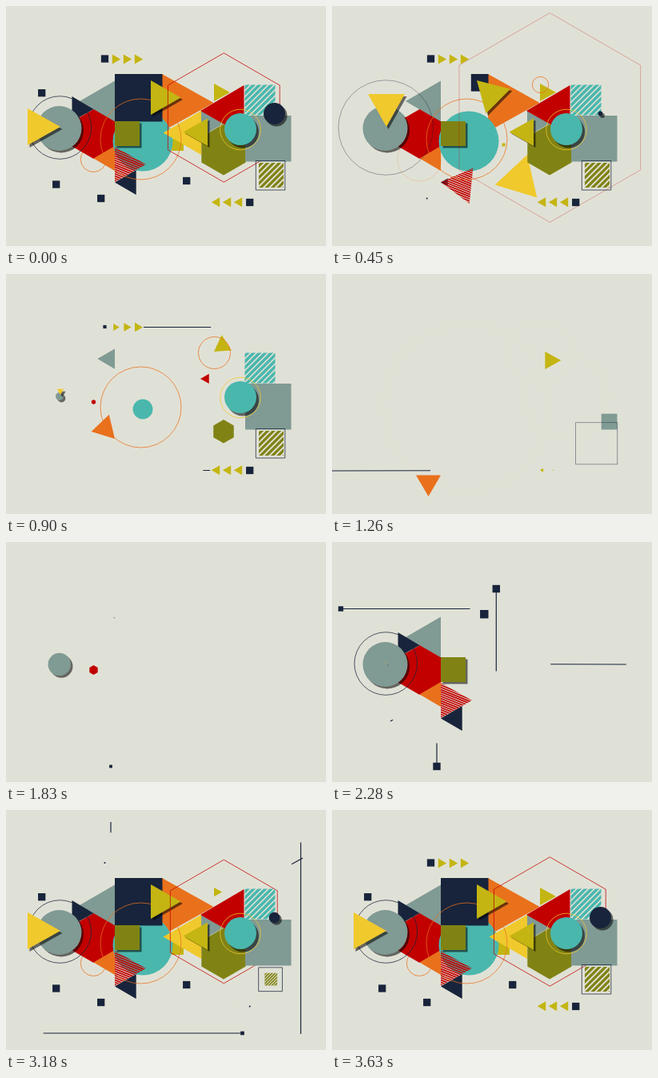
Recreate the animation shown at these times as an HTML page with a canvas. Size 400x300 px, loop 3.66 s.

```html
<!DOCTYPE html>
<html>
<head>
<meta charset="utf-8">
<style>
html, body { margin: 0; overflow: hidden; background: #e0e1d6; }
canvas { display: block; }
</style>
</head>
<body>
<canvas id="stage" width="400" height="300"></canvas>
<script>
const ctx = document.getElementById('stage').getContext('2d');
const LOOP = 3660, HALF = 1650, DUR = 360, NEVER = 9999;
const bg = '#e0e1d6', navy = '#18243b', gray = '#809a94', red = '#c20000', orange = '#e9711c',
      teal = '#4ab7ad', olive = '#808314', lime = '#c4b512', yellow = '#f0c92c';
let t = 0;

// Eased progress, cubic in and out
function ease(start, dur = DUR) {
  const u = Math.min(1, Math.max(0, (t - start) / dur));
  return u < .5 ? 4 * u ** 3 : 1 - 4 * (1 - u) ** 3;
}

const poly = (...p) => {
  const path = new Path2D();
  for (let i = 0; i < p.length; i += 2) path.lineTo(p[i], p[i + 1]);
  path.closePath();
  return path;
};
const disc = (x, y, r) => { const p = new Path2D(); p.arc(x, y, r, 0, 7); return p; };
const box = (x, y, w, h = w) => { const p = new Path2D(); p.rect(x, y, w, h); return p; };
const hex = (x, y, r) => {
  const w = r * .866, h = r / 2;
  return poly(x, y - r, x + w, y - h, x + w, y + h, x, y + r, x - w, y + h, x - w, y - h);
};

function place([x, y], scale, angle = 0, dx = 0, dy = 0) {
  ctx.translate(x + dx, y + dy);
  ctx.rotate(angle);
  ctx.scale(scale, scale);
  ctx.translate(-x, -y);
}

// stripe: [angle in degrees, gap, bar width]; spin: [degrees, start, dur]; fly: [ax, ay, start]
function solid(path, color, pivot, enter, leave, { shadow, stripe, spin, fly } = {}) {
  const leaving = t < HALF;
  const scale = leaving ? 1 - ease(leave) : ease(enter);
  if (scale < .005) return;
  const angle = leaving && spin ? spin[0] * Math.PI / 180 * ease(spin[1], spin[2]) : 0;
  const fall = leaving && fly ? Math.max(0, t - fly[2]) ** 2 : 0;
  const dx = fall * (fly ? fly[0] : 0), dy = fall * (fly ? fly[1] : 0);
  if (shadow) {
    ctx.save();
    place(pivot, scale, angle, dx + shadow[0], dy + shadow[1]);
    ctx.fillStyle = 'rgba(0,0,0,.55)';
    ctx.fill(path);
    ctx.restore();
  }
  ctx.save();
  place(pivot, scale, angle, dx, dy);
  ctx.fillStyle = color;
  if (stripe) {
    ctx.clip(path);
    ctx.translate(...pivot);
    ctx.rotate(stripe[0] * Math.PI / 180 - angle);
    for (let i = -25; i < 25; i++) ctx.fillRect(-70, i * stripe[1], 140, stripe[2]);
  } else ctx.fill(path);
  ctx.restore();
}

// Outlines grow in, then swell and fade away
function outline(path, color, center, enter, leave, swell = 2) {
  const out = t < HALF ? ease(leave) : 0;
  const scale = t < HALF ? 1 + (swell - 1) * out : ease(enter);
  if (out > .995 || scale < .005) return;
  ctx.save();
  place(center, scale);
  ctx.globalAlpha = 1 - out;
  ctx.strokeStyle = color;
  ctx.lineWidth = .75 / scale;
  ctx.stroke(path);
  ctx.restore();
}

function streak(x1, y1, x2, y2, head, headDur, tail, tailDur = headDur) {
  const a = ease(tail, tailDur), b = ease(head, headDur);
  if (b - a < .001) return;
  ctx.strokeStyle = navy;
  ctx.lineWidth = 1.2;
  ctx.beginPath();
  ctx.moveTo(x1 + (x2 - x1) * a, y1 + (y2 - y1) * a);
  ctx.lineTo(x1 + (x2 - x1) * b, y1 + (y2 - y1) * b);
  ctx.stroke();
}

// A streak that is shot from a small square
function shot(x1, y1, x2, y2, start, dur, lag = 410, hold = 150) {
  streak(x1, y1, x2, y2, start, dur, start + lag);
  const size = 9.5 * (ease(start - 250, 250) - ease(start + hold, 450));
  ctx.fillStyle = navy;
  ctx.fillRect(x1 - size / 2, y1 - size / 2, size, size);
}

const dot = (x, y, enter, leave, size = 9.3) =>
  solid(box(x - size / 2, y - size / 2, size), navy, [x, y], enter, leave);
const arrow = (x, y, dir, enter, leave) =>
  solid(poly(x - 5.2 * dir, y - 6, x - 5.2 * dir, y + 6, x + 5.2 * dir, y), lime, [x, y], enter, leave);

function lines() {
  streak(172, 66.5, 432, 66.5, 728, 400, 900, 300);
  streak(255, 245.5, -5, 246, 828, 360, 1060, 400);
  shot(11, 83.5, 350, 83.5, 2035, 500, 255, 50);
  shot(205.3, 58.5, 205.3, 280, 2037, 500, 255, 200);
  streak(368, 153, 180, 152.5, 1930, 700, 2250, 500);
  shot(131, 280.5, 131, 15, 1965, 1050, 410, 250);
  streak(73, 224, 371, 60, 2185, 700, 2640);
  shot(368.5, 20.5, 368.5, 280, 2610, 600, 410, 0);
  shot(295.5, 279, 13, 279, 2905, 400, 260, 50);
}

function leftGroup() {
  outline(disc(109.3, 191.5, 16), orange, [109.3, 191.5], 2350, 240);
  solid(poly(136, 93.5, 136, 145, 92, 119), gray, [136, 93.5], 1750, 720);
  solid(hex(109.5, 160, 31), red, [109.5, 160], 1700, 645);
  solid(poly(82.5, 113, 82.5, 144, 109.5, 129), navy, [83, 113], 1850, 60);
  solid(poly(136, 175, 136, 206, 109.5, 190.5), orange, [136, 206], 1800, NEVER,
    { spin: [-90, 781], fly: [0, .0031, 1140] });
  solid(disc(66.5, 153, 28), gray, [67, 153], 1650, 668, { shadow: [2.5, 2.5] });
  outline(disc(67.3, 152, 39.3), navy, [67.3, 152], 1800, 270);
  solid(poly(27, 128, 27, 174, 68, 151), yellow, [68, 151], 2210, 668,
    { shadow: [2.5, 3], spin: [90, 60] });
  solid(poly(162.7, 205, 162.7, 236, 136, 220.5), navy, [136, 220.5], 1900, 247);
}

function middleGroup() {
  solid(box(207, 166, 15), lime, [214.5, 173.5], 2400, 237);
  solid(poly(195, 85, 259.5, 121, 195, 157), orange, [258, 121], 2300, 565);
  solid(disc(171, 169, 37.5), teal, [171, 169], 2300, 698);
  solid(poly(136, 176, 136, 220, 175, 198), red, [136, 220], 1850, NEVER,
    { stripe: [22, 2.6, 1.7], spin: [90, 236], fly: [0, .003, 600] });
  solid(box(136, 85, 59.5), navy, [195.5, 85], 2154, 253);
  solid(box(136, 144, 31), olive, [167, 175], 1850, 560, { shadow: [2.5, 2.5] });
  solid(poly(260, 97, 260, 119, 280, 108), lime, [260, 97], 3000, NEVER,
    { spin: [-360, 756], fly: [.0017, 0, 1200] });
  solid(poly(244, 131, 244, 163, 272, 147), gray, [272, 147], 2400, 560);
  solid(poly(297.5, 99, 297.5, 162, 243, 131), red, [243, 131], 2400, 673);
  solid(poly(244, 131, 244, 186, 196.5, 158.5), yellow, [244, 186], 2400, NEVER,
    { spin: [-180, 236], fly: [0, .003, 600] });
  outline(disc(168.5, 166.5, 50.5), orange, [168.5, 166.5], 2800, 975, 2.1);
  solid(poly(181, 93, 181, 136, 218.5, 114.5), lime, [181, 93], 2850, NEVER,
    { shadow: [2.5, 2.5], spin: [-90, 325], fly: [0, .005, 600] });
  outline(hex(272.3, 139.5, 80.7), red, [272.3, 139.5], 2900, 255);
}

function rightGroup() {
  solid(hex(272, 179.5, 32), olive, [272, 211.5], 2800, 716);
  solid(poly(252, 140.5, 252, 175, 221.5, 157.5), lime, [252, 175], 2850, 560, { shadow: [2.5, 2] });
  solid(box(299, 137, 57.5), gray, [356.5, 194.5], 2690, 1060);
  solid(box(298.5, 98.5, 38), teal, [298.5, 136.5], 2850, 915, { stripe: [-45, 5.2, 3.6] });
  solid(disc(293, 154, 20), teal, [293, 154], 2850, 910, { shadow: [3, 3.5] });
  outline(disc(293, 154.5, 25.3), yellow, [293, 154.5], 2650, 975, 2.1);
  if (t < HALF) {
    const fade = ease(960), r = 20 * (ease(270) + fade);
    ctx.globalAlpha = 1 - fade;
    ctx.strokeStyle = orange;
    ctx.lineWidth = .75;
    if (r > .1) ctx.stroke(disc(260.5, 98.5, r));
    ctx.globalAlpha = 1;
  }
  solid(disc(335.5, 134.5, 13.5), navy, [335.5, 134.5], 3000, 227, { shadow: [2.5, 2.5] });
  outline(box(312.3, 193.5, 36.5), navy, [330.5, 211.8], 2950, 1090);
  solid(box(316, 196, 31), olive, [331, 212], 3000, 915, { stripe: [-45, 5.2, 3.3] });
}

function accents() {
  dot(44.7, 108.7, 2350, 60);
  dot(62.7, 223, 2380, 90);
  dot(118.7, 240.5, 2600, 223);
  dot(225.7, 218.5, 2700, 70);
  dot(123.5, 66, 3050, 715);
  dot(304.7, 245.5, 3050, 950);
  for (let i = 0; i < 3; i++) {
    arrow(138 + 14 * i, 66.5, 1, 3100 + 50 * i, 756 + 35 * i);
    arrow(262 + 14 * i, 245.3, -1, 3200 - 50 * i, 1070 - 50 * i);
  }
}

function frame(now) {
  t = now % LOOP;
  ctx.fillStyle = bg;
  ctx.fillRect(0, 0, 400, 300);
  lines();
  leftGroup();
  middleGroup();
  rightGroup();
  accents();
  requestAnimationFrame(frame);
}
requestAnimationFrame(frame);
</script>
</body>
</html>
```
